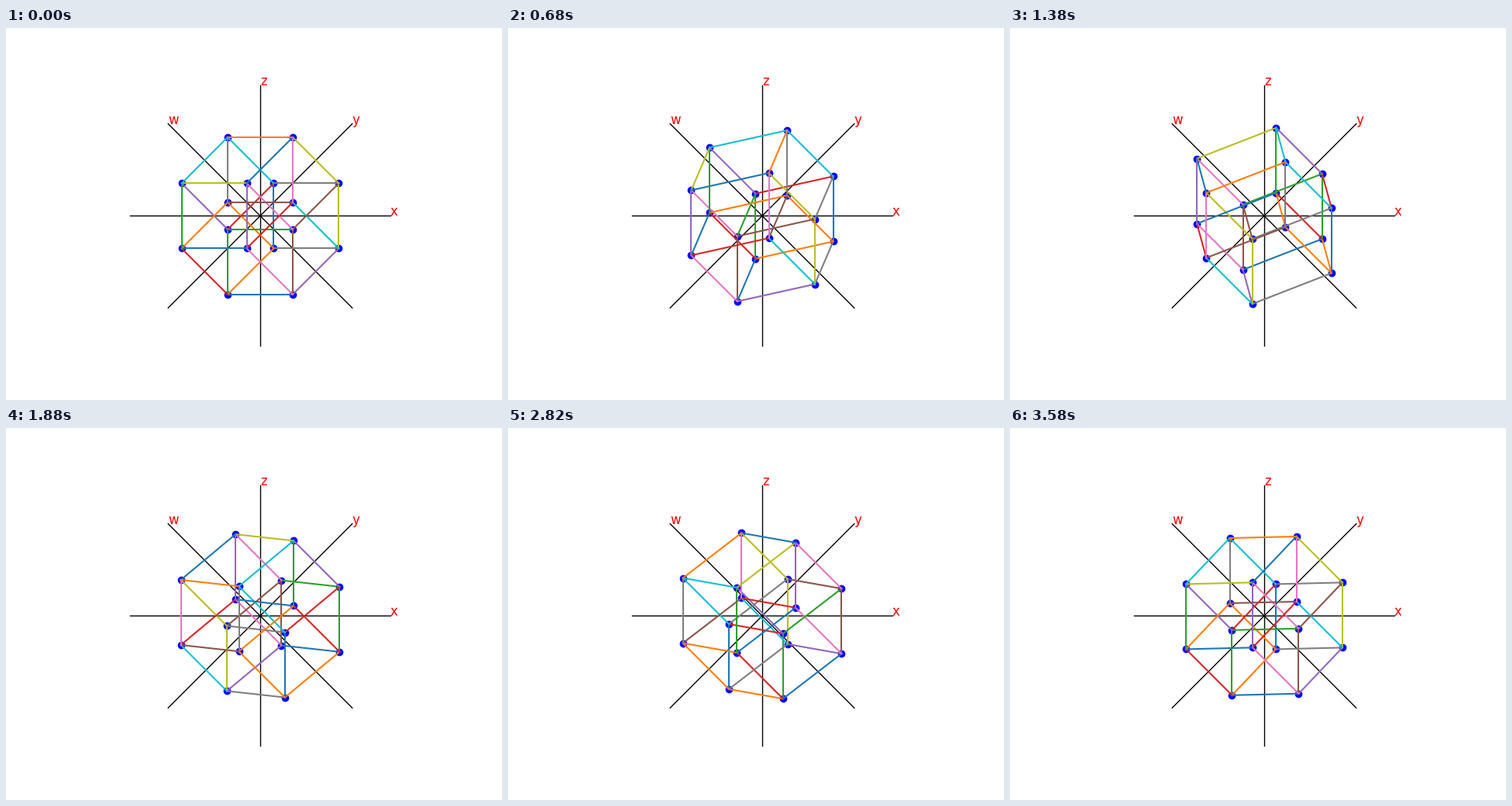
Animation of 640x480 px, one loop 3600 ms. Source, as a matplotlib script:

```python
from itertools import combinations

import matplotlib.pyplot as plt
import numpy as np
from matplotlib.animation import FuncAnimation

FRAMES = 180
INTERVAL = 20
AXIS_LENGTH = 4
DIAG = np.sqrt(0.5)

# Screen directions of the x, y, z and w axes
BASIS = np.array([[1, 0], [DIAG, DIAG], [0, 1], [-DIAG, DIAG]])

# Tesseract corners, walking round each square in turn
SQUARE = [(-1, -1), (1, -1), (1, 1), (-1, 1)]
CORNERS = np.array([(x, y, z, w)
                    for w in (-1, 1) for z in (-1, 1) for x, y in SQUARE])
EDGES = [(i, j) for i, j in combinations(range(16), 2)
         if np.count_nonzero(CORNERS[i] != CORNERS[j]) == 1]


def project(angle):
    """Rotate the corners in the xy plane and flatten them to the screen."""
    c, s = np.cos(angle), np.sin(angle)
    turn = np.eye(4)
    turn[:2, :2] = [[c, s], [-s, c]]
    return CORNERS @ turn @ BASIS


fig = plt.figure(figsize=(6.4, 4.8), dpi=100, facecolor="white")
ax = fig.add_subplot()
ax.set_aspect("equal")
ax.set_xlim(-1.1 * AXIS_LENGTH, 1.1 * AXIS_LENGTH)
ax.set_ylim(-1.1 * AXIS_LENGTH, 1.1 * AXIS_LENGTH)
ax.axis("off")

for name, tip in zip("xyzw", AXIS_LENGTH * BASIS):
    ax.plot([-tip[0], tip[0]], [-tip[1], tip[1]], color="black", lw=1)
    ax.text(*tip, name, color="red", fontsize=12, family="DejaVu Sans")

dots, = ax.plot([], [], "o", color="blue", markersize=6)
lines = [ax.plot([], [], color=f"C{k % 10}", lw=1.5)[0]
         for k in range(len(EDGES))]


def update(frame):
    points = project(-2 * np.pi * frame / FRAMES)
    dots.set_data(*points.T)
    for line, (i, j) in zip(lines, EDGES):
        line.set_data(*points[[i, j]].T)
    return [dots, *lines]


anim = FuncAnimation(fig, update, frames=FRAMES, interval=INTERVAL,
                     repeat=True, repeat_delay=0)
plt.show()
```
